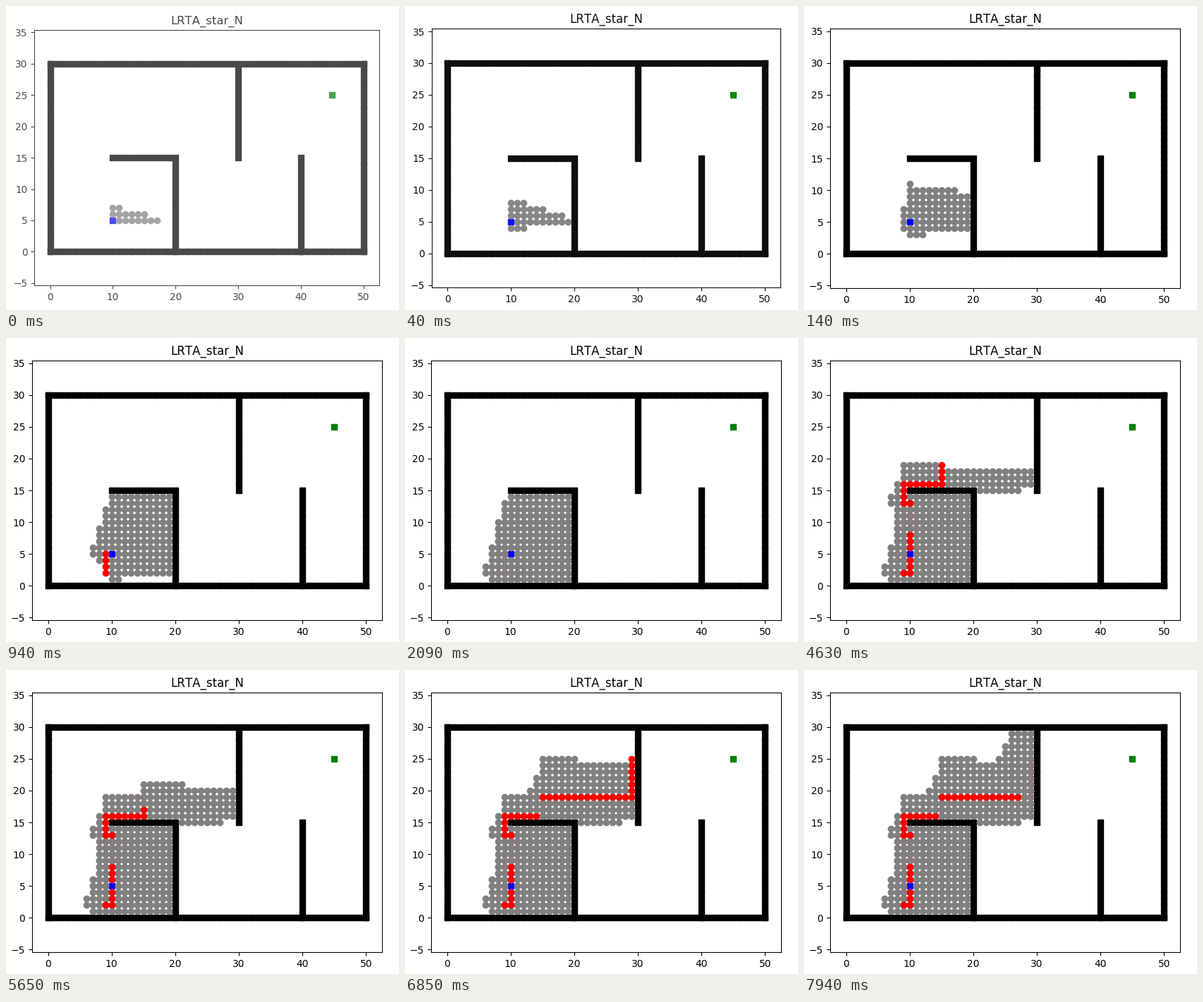
Recreate the animation shown at these times as a matplotlib script. Size 557 px wide and 431 px high, loop 8 s.

```python
import math

import matplotlib.pyplot as plt
from matplotlib.animation import FuncAnimation
from matplotlib.patches import Rectangle

W, H, DPI = 557, 431, 100
STEP, LOOP = 20, 8000
START, GOAL = (10, 5), (45, 25)
MOVES = [(1, 0), (-1, 0), (0, 1), (0, -1)]
EXPANSIONS = 150

# Cells shown after each redraw of one search; the seventh redraw adds the path.
STAGES = [15, 30, 50, 75, 105, 150]
TIMES = [
    (0, 40, 90, 140, 240, 340, 940),
    (1530, 1580, 1730, 1820, 1910, 2090, 2700),
    (3310, 3490, 3580, 3660, 3940, 4020, 4630),
    (5270, 5550, 5650, 5930, 6040, 6160, 6850),
    (7660, 7660, 7940),
]


def make_walls():
    cells = [(x, y) for x in range(51) for y in (0, 30)]
    cells += [(x, y) for x in (0, 50) for y in range(31)]
    cells += [(x, 15) for x in range(10, 21)]
    cells += [(20, y) for y in range(15)]
    cells += [(30, y) for y in range(15, 30)]
    cells += [(40, y) for y in range(16)]
    return cells


WALLS = make_walls()
BLOCKED = set(WALLS)


def h(cell):
    return math.hypot(GOAL[0] - cell[0], GOAL[1] - cell[1])


def neighbors(cell):
    steps = [(cell[0] + dx, cell[1] + dy) for dx, dy in MOVES]
    return [c for c in steps if c not in BLOCKED]


def expand(start):
    """A* from start, stopped after a fixed number of expansions."""
    frontier, cost, closed = {start}, {start: 0}, []
    while len(closed) < EXPANSIONS:
        cell = min(frontier, key=lambda c: (cost[c] + h(c), c))
        frontier.remove(cell)
        closed.append(cell)
        for n in neighbors(cell):
            if n not in closed and cost[cell] + 1 < cost.get(n, math.inf):
                cost[n] = cost[cell] + 1
                frontier.add(n)
    return closed


def learn(closed):
    """Relax the heuristic inside the closed set until it settles."""
    value = {c: math.inf for c in closed}
    changed = True
    while changed:
        changed = False
        for c in closed:
            best = min(1 + value.get(n, h(n)) for n in neighbors(c))
            if best != value[c]:
                value[c] = best
                changed = True
    return value


def walk_out(start, value):
    """Follow the lowest values until the path leaves the closed set."""
    path = [start]
    while path[-1] in value:
        path.append(min(neighbors(path[-1]), key=lambda n: value.get(n, h(n))))
    return path


def run_searches(count):
    rounds, start = [], START
    for _ in range(count):
        closed = expand(start)
        path = walk_out(start, learn(closed))
        start = path[-1]
        rounds.append([[c for c in part if c != START] for part in (closed, path)])
    return rounds


ROUNDS = run_searches(len(TIMES))

plt.rcParams["text.kerning_factor"] = 6
fig = plt.figure(figsize=((W + 0.01) / DPI, (H + 0.01) / DPI), dpi=DPI, facecolor="white")
ax = fig.add_axes([0, 0, 1, 1])
AX_LEFT, AX_TOP, AX_W, AX_H = 37, 31.97, 496, 368.06
half = AX_H / (AX_W / 55) / 2
ax.set_xlim(-2.5, 52.5)
ax.set_ylim(15 - half, 15 + half)
ax.set_xticks(range(0, 51, 10))
ax.set_yticks(range(-5, 36, 5))
title = ax.set_title("LRTA_star_N")


def dots(cells, color, marker):
    xs, ys = [c[0] for c in cells], [c[1] for c in cells]
    return ax.plot(xs, ys, color=color, marker=marker, linestyle="")[0]


def show(line, cells):
    line.set_data([c[0] for c in cells], [c[1] for c in cells])


grid = [dots([START], "b", "s"), dots([GOAL], "g", "s"), dots(WALLS, "k", "s")]
layers = [(dots([], "gray", "o"), dots([], "r", "o")) for _ in TIMES]
marks = grid + [line for pair in layers for line in pair]

veil = Rectangle((0, 0), 1, 1, transform=fig.transFigure, color="white", lw=0, zorder=10)
fig.add_artist(veil)


def set_zoom(s, fade):
    """Scale the whole plot about a fixed point, as a window opening."""
    cx, cy = 265, 160
    left = cx + (AX_LEFT - cx) * s
    bottom = cy + (AX_TOP + AX_H - cy) * s
    ax.set_position([left / W, 1 - bottom / H, AX_W * s / W, AX_H * s / H])
    ax.tick_params(labelsize=10 * s)
    title.set_fontsize(12 * s)
    for line in marks:
        line.set_markersize(6 * s)
    veil.set_alpha(fade)
    veil.set_visible(fade > 0)


def update(i):
    t = i * STEP + STEP / 2
    if t < 40:
        set_zoom(0.985, 0.29)
    elif t < 90:
        set_zoom(0.997, 0.06)
    else:
        set_zoom(1, 0)
    for (seen, walked), (closed, path), times in zip(layers, ROUNDS, TIMES):
        n = sum(t >= when for when in times)
        show(seen, closed[:STAGES[min(n, 6) - 1]] if n else [])
        show(walked, path if n == 7 else [])
    return marks


anim = FuncAnimation(fig, update, frames=LOOP // STEP, interval=STEP, repeat=True,
                     cache_frame_data=False)
plt.show()
```
